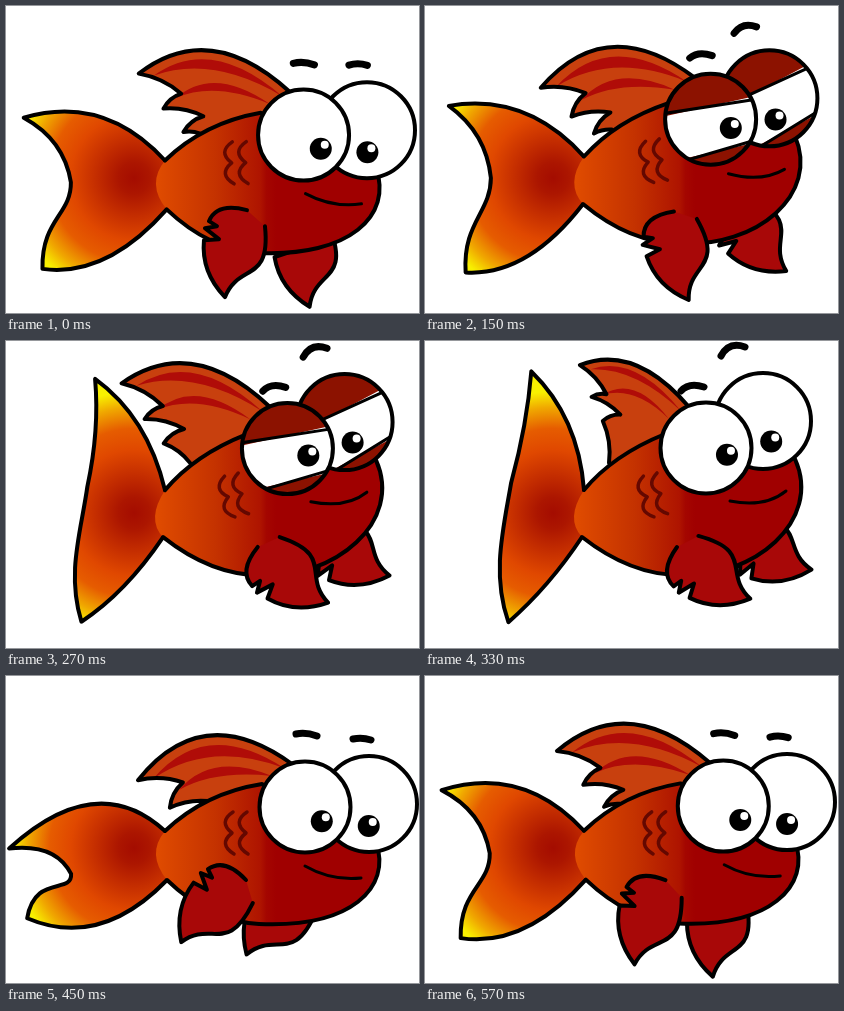
These frames come from a looping animation (413x307 px, 0.6 s). An HTML page with a canvas:

```html
<!DOCTYPE html>
<html lang="en">
<head>
<meta charset="utf-8">
<title>Swimming goldfish</title>
<style>
  html, body { margin: 0; width: 100%; height: 100%; overflow: hidden; background: #fff; }
  canvas { display: block; }
</style>
</head>
<body>
<canvas id="stage" width="413" height="307"></canvas>
<script>
const ctx = document.getElementById('stage').getContext('2d');
const LOOP = 600, STEP = 30, RAD = Math.PI / 180;

// The whole rig is driven by five values: head lift (0 to 1) and four angles in degrees.
const TIMES = [0, 90, 210, 330, 390, 450, 570];
const CHANNELS = {
  lift: [.08, .48, .92, 1, .375, 0, .04],
  tail: [25, 16, 50, 70, 18, 2, 24],
  dorsal: [7, -4, -3, 21, 2, -6, 4.5],
  frontFin: [0, 6, -58, -69, 0, 32, 6],
  backFin: [-15, -37, -66, -78, -6, 29, -5]
};

// Parts that bend with the head: lowered and lifted pose.
const parse = (...rows) => rows.map(row => row.split(/[ ,]+/).map(Number));
const BODY = parse(
  '159,155 199,117 256,108 370,166 386,212 345,252 253,248 220,246 190,232 161,204',
  '159,149 188,114 240,93 370,118 398,180 328,238 255,234 218,234 185,218 157,196');
const EYES = parse('299,131 363,128', '281,107 338,80');
const MOUTH = parse('299,190 325,205 355,202', '305,160 340,167 361,150');
const BROWS = parse(
  '290,58 300,56 311,60 347,63 356,61 365,64',
  '256,50 264,41 279,46 296,15 304,0 320,6');

const mix = (a, b, k) => a + (b - a) * k;
const mixAll = (a, b, k) => a.map((v, i) => mix(v, b[i], k));
const pose = (pair, k) => mixAll(pair[0], pair[1], k);
const clamp = v => Math.max(0, Math.min(1, v));

// Point at an angle above the leftward axis.
const polar = ([x, y], deg, r) => [x - r * Math.cos(deg * RAD), y - r * Math.sin(deg * RAD)];

// Periodic monotone cubic through the key values.
function valueAt(keys, t) {
  const n = TIMES.length;
  const wrap = i => (i + n) % n;
  const span = i => (i === n - 1 ? LOOP : TIMES[i + 1]) - TIMES[i];
  const slope = i => (keys[wrap(i + 1)] - keys[wrap(i)]) / span(wrap(i));
  const tangent = i => {
    const p = slope(i - 1), q = slope(i);
    return p * q > 0 ? 2 * p * q / (p + q) : 0;
  };
  const i = TIMES.findLastIndex(start => start <= t);
  const h = span(i), u = (t - TIMES[i]) / h;
  return mix(keys[i], keys[wrap(i + 1)], u * u * (3 - 2 * u))
    + h * u * (1 - u) * (tangent(i) * (1 - u) - tangent(i + 1) * u);
}

// Builds a path from command letters and a flat run of coordinates.
function trace(ops, flat) {
  const path = new Path2D();
  let k = 0;
  const take = n => flat.slice(k, k += n);
  for (const op of ops) {
    if (op === 'M') path.moveTo(...take(2));
    if (op === 'L') path.lineTo(...take(2));
    if (op === 'Q') path.quadraticCurveTo(...take(4));
    if (op === 'C') path.bezierCurveTo(...take(6));
  }
  return path;
}

function fill(path, color) {
  ctx.fillStyle = color;
  ctx.fill(path);
}

function stroke(path, width = 4, color = '#000') {
  ctx.lineWidth = width;
  ctx.strokeStyle = color;
  ctx.stroke(path);
}

function disc(x, y, r, color) {
  const path = new Path2D();
  path.arc(x, y, r, 0, 2 * Math.PI);
  fill(path, color);
  return path;
}

function turned(x, y, angle, paint) {
  ctx.save();
  ctx.translate(x, y);
  ctx.rotate(angle);
  paint();
  ctx.restore();
}

function withStops(gradient, stops) {
  stops.forEach(([at, color]) => gradient.addColorStop(at, color));
  return gradient;
}

const tailPaint = withStops(ctx.createRadialGradient(128, 172, 0, 128, 172, 132), [
  [0, '#a40c00'], [.12, '#ac1600'], [.48, '#e04800'], [.64, '#e65c00'], [.8, '#f0a800'], [.92, '#f8f000']
]);
const bodyPaint = withStops(ctx.createLinearGradient(150, 0, 270, 0), [
  [0, '#e04c00'], [.5, '#c43200'], [.87, '#ae1400'], [.92, '#a40600'], [1, '#a00000']
]);

// The lobes swing around the tail root; the rest of the edge follows the upper tip.
function drawTail(angle, shell) {
  const root = [160, 178], bow = angle * angle;
  const path = trace('MQQCQ', [
    ...shell.slice(0, 2),
    ...polar(root, 51 + .0072 * bow, 110 - .0016 * bow),
    ...polar(root, angle, 157),
    ...polar(root, 4 + .78 * angle, 111),
    ...polar(root, -13 + .56 * angle, 97 - .003 * bow),
    ...polar(root, -24 + .24 * angle, 102 - .004 * bow),
    ...polar(root, -8 - .32 * angle, 133 - .005 * bow),
    ...polar(root, -24 - .42 * angle, 153 - .005 * bow),
    ...polar(root, -55 - .1 * angle, 116 - .008 * bow),
    ...shell.slice(-2)
  ]);
  fill(path, tailPaint);
  stroke(path);
}

// The fin pivots at its front end and folds shorter when raised.
function drawDorsal(angle, lift) {
  const base = mixAll([286, 88], [264, 66], lift);
  const end = mixAll([195, 128], [184, 122], lift);
  const size = 1 - 2.6e-5 * angle ** 3;
  const spoke = (deg, follow, r) => polar(base, deg + follow * angle, r * size);
  const crown = spoke(39, .5, 110);
  const tip = spoke(0, 1, 154), notch = spoke(-5.5, .68, 110);
  const tip2 = spoke(-14, .95, 129), notch2 = spoke(-20, .65, 91), tip3 = spoke(-26, .8, 115);

  const edge = [...base, ...crown, ...tip];
  const ridge = [tip, notch, tip2, notch2, tip3, end];
  for (let i = 1; i < ridge.length; i++) {
    const a = ridge[i - 1], b = ridge[i], k = i % 2 ? .14 : -.2;
    const m = mixAll(a, b, .5);
    edge.push(m[0] + (b[1] - a[1]) * k, m[1] - (b[0] - a[0]) * k, ...b);
  }
  fill(trace('MQQQQQQL', [...edge, base[0], end[1] + 15]), '#c8400e');

  const mid = mixAll(base, tip, .5);
  const stripe = (from, to, top, low) => fill(trace('MQQ', [
    ...from, ...mixAll(crown, mid, top), ...to, ...mixAll(crown, mid, low), ...from
  ]), '#b00c08');
  stripe(mixAll(tip, base, .1), [base[0] - 8, base[1] + 4], .25, .56);
  stripe(mixAll(notch, tip2, .3), [base[0] - 20, base[1] + 12], .72, .97);
  stroke(trace('MQQQQQQ', edge));
}

// One fin shape, hinged at its shoulder.
function drawFin([x, y], angle) {
  turned(x, y, angle * RAD, () => {
    const path = trace('MQLLLLQC', [
      0, 0, -30, -8, -38, 11, -30, 16, -42, 18, -28, 29, -43, 30,
      -46, 62, -22, 87, -8, 52, 24, 74, 18, 16
    ]);
    fill(path, '#a80808');
    stroke(path);
  });
}

function drawBody(shell) {
  const ops = 'MQLCC';
  fill(trace(ops + 'Q', [...shell, 140, 178, ...shell.slice(0, 2)]), bodyPaint);
  stroke(trace(ops, shell));
}

function drawScales(lift) {
  turned(234 - 4 * lift, 157 - 3 * lift, -.23 * lift, () => {
    for (const x of [-7, 7]) {
      stroke(trace('MQQ', [x, -21, x - 15, -11, x - 1, 0, x - 15, 11, x + 1, 21]), 3.5, '#640800');
    }
  });
}

function drawEye(x, y, r, look, lid, depth, shut) {
  const ball = disc(x, y, r, '#fff');
  const px = x + 22 * Math.cos(look), py = y + 22 * Math.sin(look);
  disc(px, py, 11, '#000');
  disc(px + 4, py - 4, 4, '#fff');
  if (shut > 0) {
    ctx.save();
    ctx.clip(ball);
    turned(x, y, lid, () => {
      const top = mix(-r, depth, shut), low = mix(r, depth, shut);
      ctx.fillStyle = '#8c1200';
      ctx.fillRect(-r, -r, 2 * r, top + r);
      ctx.fillRect(-r, low, 2 * r, r - low);
      stroke(trace('ML', [-r, top - 3, r, top + 3]), 3);
      stroke(trace('ML', [-r, low + 3, r, low - 3]), 3);
    });
    ctx.restore();
  }
  stroke(ball);
}

function draw(t) {
  ctx.fillStyle = '#fff';
  ctx.fillRect(0, 0, 413, 307);
  ctx.lineCap = ctx.lineJoin = 'round';

  const rig = {};
  for (const name in CHANNELS) rig[name] = valueAt(CHANNELS[name], t);
  const { lift } = rig;
  const shell = pose(BODY, lift);
  const [fx, fy, bx, by] = pose(EYES, lift);
  const line = Math.atan2(by - fy, bx - fx);
  const shut = clamp((90 - Math.abs(t - 210)) / 60);

  drawTail(rig.tail, shell);
  drawDorsal(rig.dorsal, lift);
  drawFin(mixAll([302, 213], [306, 189], lift), rig.backFin);
  drawBody(shell);
  drawScales(lift);
  drawFin(mixAll([240, 204], [252, 206], lift), rig.frontFin);
  stroke(trace('MQ', pose(MOUTH, lift)), 3);
  drawEye(bx, by, 48, line + 1.63, -.49, 25, shut);
  drawEye(fx, fy, 45.5, line + .75, -.22, 20, shut);
  stroke(trace('MQMQ', pose(BROWS, lift)), 7);
}

const start = performance.now();
function tick() {
  const t = (performance.now() - start) % LOOP;
  draw(Math.floor(t / STEP) * STEP);
  requestAnimationFrame(tick);
}
tick();
</script>
</body>
</html>
```
